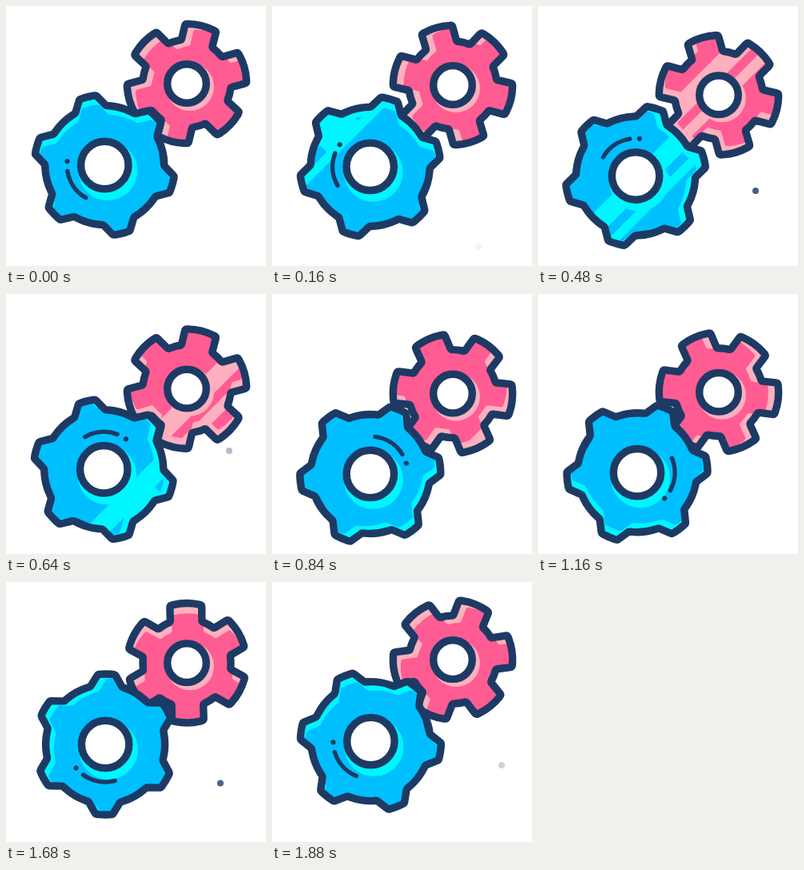
An HTML page with a canvas that plays this animation: 325x325 px, repeating every 1.92 s.

```html
<!DOCTYPE html>
<html lang="en">
<head>
<meta charset="utf-8">
<title>Gears</title>
<style>
html, body { margin: 0; width: 100%; height: 100%; overflow: hidden; background: #fff; }
canvas { display: block; width: 325px; height: 325px; }
</style>
</head>
<body>
<canvas id="stage" width="325" height="325"></canvas>
<script>
const LOOP = 1920, STEP = 40, SIZE = 325, TAU = Math.PI * 2;
const NAVY = '#1d3a64';
const canvas = document.getElementById('stage');
const ctx = canvas.getContext('2d');
const dpr = window.devicePixelRatio || 1;
canvas.width = canvas.height = SIZE * dpr;

const rad = d => d * Math.PI / 180;
const polar = (r, d) => [r * Math.cos(rad(d)), r * Math.sin(rad(d))];
const clamp = v => Math.max(0, Math.min(1, v));
const ramp = (t, a, b) => clamp((t - a) / (b - a));

// Closed gear outline with softened corners; angles are half-widths in degrees.
function gearPath({ first, tip, tipR, base, baseR }) {
  const p = new Path2D(), inset = 3, round = 3;
  p.moveTo(...polar(baseR, first - 30));
  for (let i = 0; i < 6; i++) {
    const c = first + i * 60;
    const arc = (r, a, b) => p.arc(0, 0, r, rad(c + a), rad(c + b));
    const corner = (r, a, nextR, next) =>
      p.arcTo(...polar(r, c + a), ...polar(nextR, c + next), round);
    corner(baseR, -base, tipR, -tip);
    corner(tipR, -tip, tipR, inset - tip);
    arc(tipR, inset - tip, tip - inset);
    corner(tipR, tip, baseR, base);
    corner(baseR, base, baseR, base + inset);
    arc(baseR, base + inset, 60 - base - inset);
  }
  p.closePath();
  return p;
}

// Bands: across range relative to the gap, then optional range along the stripe.
const pink = {
  path: gearPath({ first: 44, tip: 15.5, tipR: 74.7, base: 21, baseR: 55 }),
  main: '#ff5c93', light: '#ffb0be',
  turn: -1, shade: 215, shift: 13,
  hole: 24.3, glow: [4, 4, 30],
  gap: t => 328 + 0.4 * (t - 480),
  bands: [[-42, -8], [8, 27]]
};

const blue = {
  path: gearPath({ first: 16, tip: 7, tipR: 88, base: 15.5, baseR: 74.5 }),
  main: '#00bfff', light: '#00f5ff',
  turn: 1, shade: 254, shift: 12,
  hole: 29.7, glow: [4, 7, 37],
  gap: t => 371 + 0.4 * (t - 480),
  bands: [[-43, -8], [8, 24], [-9, 9, -36, 42], [-9, 9, 88, 300]]
};

function disc(x, y, r, color) {
  ctx.fillStyle = color;
  ctx.beginPath();
  ctx.arc(x, y, r, 0, TAU);
  ctx.fill();
}

// Diagonal strip: x + y from a to b, x - y from c to d.
function strip(a, b, c = -400, d = 400) {
  const pt = (u, v) => ctx.lineTo((u + v) / 2, (u - v) / 2);
  ctx.beginPath();
  pt(a, c);
  pt(b, c);
  pt(b, d);
  pt(a, d);
  ctx.fill();
}

function drawGear(g, x, y, t, detail) {
  const spin = g.turn * TAU * t / LOOP;
  const [sx, sy] = polar(g.shift, g.shade);
  ctx.save();
  ctx.translate(x, y);

  ctx.save();
  ctx.rotate(spin);
  ctx.clip(g.path);
  ctx.fillStyle = g.light;
  ctx.fill(g.path);
  ctx.translate(-sx, -sy);
  ctx.fillStyle = g.main;
  ctx.fill(g.path);
  ctx.translate(sx, sy);
  ctx.rotate(-spin);
  ctx.fillStyle = g.light;
  const gap = g.gap(t) - x - y;
  for (const [a, b, c, d] of g.bands) strip(gap + a, gap + b, c, d);
  disc(...g.glow, g.light);
  ctx.restore();

  ctx.strokeStyle = NAVY;
  ctx.lineWidth = 9.4;
  ctx.lineJoin = ctx.lineCap = 'round';
  disc(0, 0, g.hole, '#fff');
  ctx.stroke();
  ctx.rotate(spin);
  ctx.stroke(g.path);
  if (detail) detail();
  ctx.restore();
}

function shine() {
  ctx.lineWidth = 5.4;
  ctx.beginPath();
  ctx.arc(0, 0, 47, rad(120), rad(171));
  ctx.stroke();
  disc(...polar(47, 186), 3.1, NAVY);
}

function spark(x, y, alpha) {
  if (alpha <= 0) return;
  ctx.globalAlpha = alpha;
  disc(x, y, 4, NAVY);
  ctx.globalAlpha = 1;
}

function draw(t) {
  const phase = TAU * t / LOOP;
  const drop = (1 - Math.cos(phase)) / 2;
  ctx.setTransform(dpr, 0, 0, dpr, 0, 0);
  ctx.fillStyle = '#fff';
  ctx.fillRect(0, 0, SIZE, SIZE);

  drawGear(pink, 226, 97 + 28.7 * drop, t);
  drawGear(blue, 123.3 - 1.2 * Math.sin(phase), 199 + 27 * drop, t, shine);

  const a = (t - 320) / 160;
  spark(265 + 7 * a, 266 - 35 * a, 0.82 * ramp(t, 140, 460) * (1 - ramp(t, 520, 720)));
  const b = (t - 1480) / 400;
  spark(249 + 38 * b, 274 - 45 * b, 0.85 * ramp(t, 1400, 1580) * (1 - ramp(t, 1660, 1960)));
}

const start = performance.now();
function tick() {
  const t = (performance.now() - start) % LOOP;
  draw(Math.floor(t / STEP) * STEP);
  requestAnimationFrame(tick);
}
tick();
</script>
</body>
</html>
```
